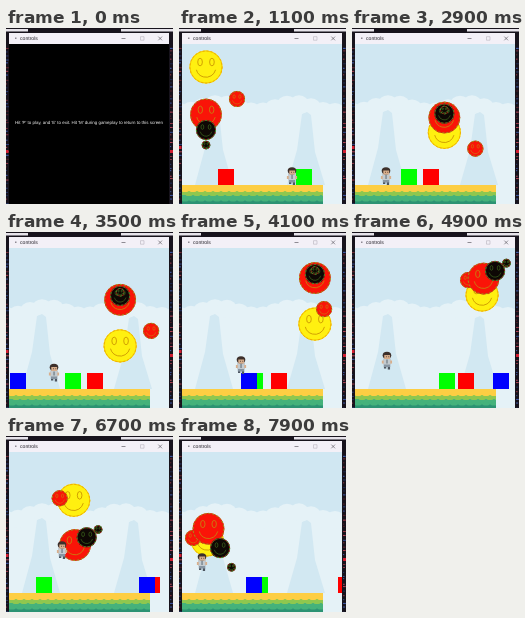
An HTML page with a canvas for the animation above (8000 ms loop, 167 by 176 pixels).

```html
<!DOCTYPE html>
<html lang="en">
<head>
<meta charset="utf-8">
<title>controls</title>
<style>
html, body { margin: 0; width: 100%; height: 100%; overflow: hidden; background: #17131c; }
canvas { display: block; width: 167px; height: 176px; }
</style>
</head>
<body>
<canvas id="stage"></canvas>
<script>
const W = 167, H = 176, LOOP = 8, GAME_START = 0.7;
const LEFT = 3, RIGHT = 163, TOP = 16, GROUND = 157, GROUND_END = 144;
const BOX = 16, BALL_FLOOR = 136.5;
const canvas = document.getElementById('stage');
const ctx = canvas.getContext('2d');
const ratio = window.devicePixelRatio || 1;
canvas.width = W * ratio;
canvas.height = H * ratio;
ctx.scale(ratio, ratio);

function rect(color, x, y, w, h) {
  ctx.fillStyle = color;
  ctx.fillRect(x, y, w, h);
}

function ellipse(color, x, y, rx, ry = rx) {
  ctx.fillStyle = color;
  ctx.beginPath();
  ctx.ellipse(x, y, rx, ry, 0, 0, 7);
  ctx.fill();
}

function stroke(color, width, build, dash = []) {
  ctx.strokeStyle = color;
  ctx.lineWidth = width;
  ctx.setLineDash(dash);
  ctx.beginPath();
  build();
  ctx.stroke();
}

function text(value, x, y, size, color) {
  ctx.font = `${size}px "Liberation Sans", Arial, sans-serif`;
  ctx.textRendering = 'geometricPrecision';
  ctx.fillStyle = color;
  ctx.fillText(value, x, y);
}

function clipTo(x, y, w, h, draw) {
  ctx.save();
  ctx.beginPath();
  ctx.rect(x, y, w, h);
  ctx.clip();
  draw();
  ctx.restore();
}

function seeded(seed) {
  return () => (seed = (seed * 16807) % 2147483647) / 2147483647;
}

const mod = (a, n) => ((a % n) + n) % n;

// Position bouncing between two walls.
function bounce(p, lo, hi) {
  const span = hi - lo;
  return hi - Math.abs(mod(p - lo, 2 * span) - span);
}

// Interpolates rows of [time, ...values].
function along(keys, t) {
  const i = Math.max(1, keys.findIndex(key => key[0] >= t));
  const [from, to] = [keys[i - 1], keys[i]];
  const k = (t - from[0]) / (to[0] - from[0]);
  return from.slice(1).map((value, n) => value + (to[n + 1] - value) * k);
}

const skins = {
  yellow: { fill: '#fff010', rim: '#f0c000', dash: '#f0a000', face: '#c89000' },
  red: { fill: '#fa1408', rim: '#d03010', dash: '#90c020', face: '#c09010' },
  black: { fill: '#0e0805', rim: '#b02418', dash: '#20b030', face: '#4f8a26' }
};

const balls = [
  { skin: skins.yellow, r: 16.5, x: 27, y: 39 },
  { skin: skins.red, r: 8, x: 58, y: 71 },
  { skin: skins.red, r: 15.8, x: 27, y: 86.5 },
  { skin: skins.black, r: 10, x: 27, y: 102 },
  { skin: skins.black, r: 4.3, x: 27, y: 117 }
];

// The balls lose a little speed late in the game.
function ballDistance(t) {
  const slowAt = 5.8;
  return 36.3 * (Math.min(t, slowAt) - 1.1) + 33 * Math.max(0, t - slowAt);
}

// The green box changes speed; each lap adds 176.
const greenKeys = [[1.1, 117], [2.9, 225], [4.1, 244], [5.8, 284], [6.7, 382], [7.9, 425]];
const boxes = [
  { color: '#ff0000', x: t => 39 + 17.6 * (t - 1.1) },
  { color: '#00ff00', x: t => mod(along(greenKeys, t)[0] + BOX, 176) - BOX },
  { color: '#0000ff', x: t => t < 3.3 ? -BOX : mod(98 * (t - 3.3), 184) - BOX }
];

// Time, middle and feet of the player.
const poses = [[1.1, 113, 157], [2.9, 34, 157], [4.1, 62, 142],
  [5.8, 4.5, 132.5], [6.7, 56, 123], [7.9, 23, 135]];

function drawDesktop(t) {
  rect('#17131c', 0, 0, W, H);
  rect('#e6e3ea', 0, 1, 22, 2.5);
  rect('#e6e3ea', 115, 1, 52, 2.5);
  const random = seeded(41);
  for (let y = 18; y < H; y += 4) {
    for (const x of [0, RIGHT + 1]) {
      const hue = random() < 0.5 ? 350 : 225;
      rect(`hsl(${hue}, 45%, ${20 + 30 * random()}%)`, x, y + 2 * random(), 1 + 2 * random(), 1);
    }
  }
  rect('#d21d31', 164, 122, 3, 3);
  rect('#d21d31', 0, t < 0.1 ? 122 : 118, 2.5, 3);
}

function drawTitleBar() {
  rect('#f3f0f7', LEFT, 5, RIGHT - LEFT, 11);
  rect('#8d8993', 9, 9.5, 1.5, 1.5);
  text('controls', 14, 12.3, 5.1, '#25222a');
  const line = '#4b4751';
  stroke(line, 0.6, () => { ctx.moveTo(115.5, 10.5); ctx.lineTo(119.5, 10.5); });
  stroke('#aaa6b0', 0.5, () => ctx.rect(134.5, 8.7, 3.5, 3.5));
  stroke(line, 0.6, () => {
    ctx.moveTo(152.3, 8.6); ctx.lineTo(156, 12.3);
    ctx.moveTo(156, 8.6); ctx.lineTo(152.3, 12.3);
  });
}

function drawMountain(x, top) {
  ctx.fillStyle = '#d2e8f2';
  ctx.beginPath();
  ctx.moveTo(x - 19, GROUND);
  ctx.lineTo(x - 9, top + 38);
  ctx.lineTo(x - 4, top + 2);
  ctx.lineTo(x + 1, top);
  ctx.lineTo(x + 5, top + 3);
  ctx.lineTo(x + 9, top + 40);
  ctx.lineTo(x + 19, GROUND);
  ctx.fill();
}

function drawScenery() {
  const sky = '#d0e7f2', cloud = '#e5f2f7';
  rect(sky, LEFT, TOP, RIGHT - LEFT, H - TOP);
  rect(cloud, LEFT, 80, RIGHT - LEFT, H - 80);
  for (let x = 0; x <= W; x += 12) {
    ellipse(cloud, x, 80 - 4 * Math.cos((x - 40) / 12), 10, 9);
  }
  drawMountain(35, 82);
  drawMountain(127, 84);
}

function drawGround() {
  const width = GROUND_END - LEFT, lime = '#8fc74f', teal = '#45b27b', deep = '#2c9373';
  clipTo(LEFT, GROUND, width, H - GROUND, () => {
    rect('#fdce43', LEFT, GROUND, width, 6);
    rect(lime, LEFT, 163, width, 4);
    rect(teal, LEFT, 167, width, 6);
    rect(deep, LEFT, 172.5, width, 4);
    for (let x = 6; x < GROUND_END + 5; x += 8) {
      ellipse('#fdce43', x, 162.5, 3.5, 1.6);
      ellipse(lime, x + 4, 166.5, 3.5, 1.6);
      ellipse(teal, x, 172, 3.5, 1.6);
    }
  });
}

function drawBall({ skin, r, x, y }, distance) {
  ctx.save();
  ctx.translate(bounce(x + distance, LEFT + r, RIGHT + 1 - r),
    bounce(y + distance, TOP + r, BALL_FLOOR - r));
  const rim = () => ctx.arc(0, 0, r - 0.4, 0, 7);
  ellipse(skin.fill, 0, 0, r);
  stroke(skin.rim, 0.8, rim);
  stroke(skin.dash, 0.8, rim, [2, 2]);
  const width = Math.max(0.5, r * 0.05);
  for (const side of [-1, 1]) {
    stroke(skin.face, width, () => ctx.ellipse(side * r * 0.36, -r * 0.3, r * 0.14, r * 0.23, 0, 0, 7));
  }
  stroke(skin.face, width, () => ctx.arc(0, r * 0.02, r * 0.6, 0.25, Math.PI - 0.25));
  ctx.restore();
}

function drawPlayer(t) {
  const [x, y] = along(poses, t);
  const step = Math.round(t * 10) % 2;
  const hair = '#3d302b', skin = '#d8ae8c', coat = '#c3cbd0';
  ctx.save();
  ctx.translate(x, y);
  rect('#4c5560', -3, -3, 2.3, 3 - step);
  rect('#4c5560', 0.8, -3, 2.3, 2 + step);
  rect('#8795a2', -3.2, -6, 6.5, 3.5);
  rect(coat, -4, -11, 8, 6);
  rect('#7e8992', -0.7, -10, 1.5, 4);
  for (const side of [-1, 1]) rect(skin, side * 4.2 - 0.9, -9, 1.8, 3);
  ellipse(hair, 0, -14.2, 4.3, 3.6);
  rect(skin, -2.7, -14.5, 5.8, 4);
  for (const eye of [-1, 1.4]) rect(hair, eye, -13.2, 0.8, 0.9);
  ctx.restore();
}

function drawGame(t) {
  drawScenery();
  drawGround();
  for (const box of boxes) rect(box.color, Math.round(box.x(t)), GROUND - BOX, BOX, BOX);
  const distance = ballDistance(t);
  balls.forEach(ball => drawBall(ball, distance));
  drawPlayer(t);
}

function drawMenu() {
  rect('#000', LEFT, TOP, RIGHT - LEFT, H - TOP);
  text("Hit 'P' to play, and 'E' to exit. Hit 'M' during gameplay to return to this screen",
    9, 96.3, 4.45, '#f2f2f2');
}

function render() {
  // The picture advances ten times a second.
  const t = Math.floor(performance.now() / 100) % (LOOP * 10) / 10;
  drawDesktop(t);
  drawTitleBar();
  clipTo(LEFT, TOP, RIGHT - LEFT, H - TOP, () => t < GAME_START ? drawMenu() : drawGame(t));
  requestAnimationFrame(render);
}
render();
</script>
</body>
</html>
```
